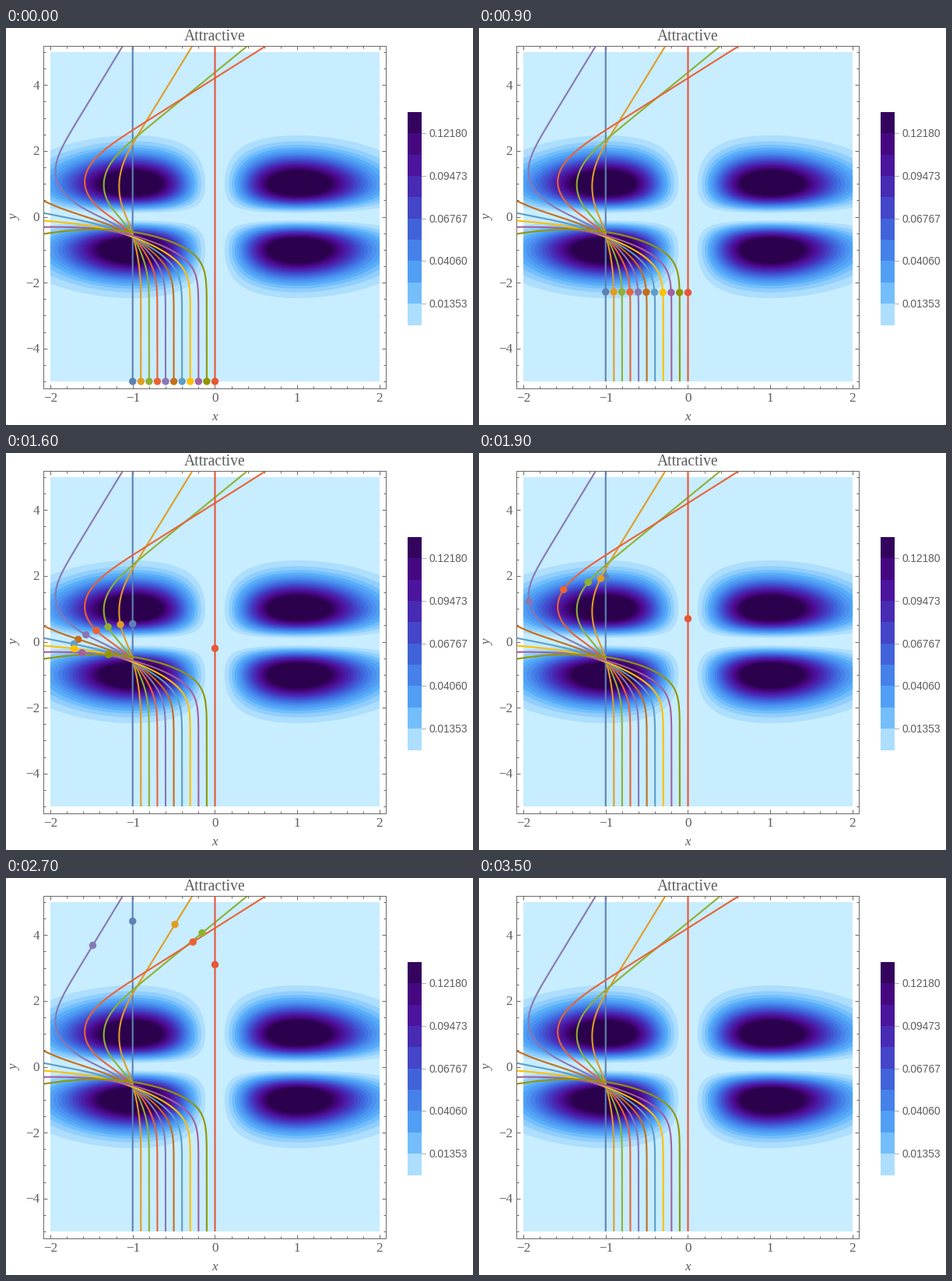
Animation of 600x510 px, one loop 5000 ms. Source, as a matplotlib script:

```python
import numpy as np
import matplotlib.pyplot as plt
from matplotlib.animation import FuncAnimation
from matplotlib.colors import LinearSegmentedColormap
from matplotlib.patches import Rectangle

W, H, DPI = 600, 510, 120
PX = 72 / DPI                      # points per pixel
INTERVAL, FRAMES, LAST = 100, 50, 35
STRIDE, SUB = 0.3, 30              # path length per frame, substeps per frame
INK, GREY = "#5c5c5c", "#6a6a6a"

COLORS = ["#5e81b5", "#e19c24", "#8fb032", "#eb6235", "#8778b3", "#c56e1a",
          "#5d9ec7", "#ffbf00", "#a5609d", "#929600", "#e95536"]
SEA = LinearSegmentedColormap.from_list(
    "sea", ["#c7edff", "#57aefa", "#4072e4", "#4536be", "#4e0b93", "#2b004d"])


# ---- physics: four wells of depth U, launch speed scaled to one ----

def well(x, y):
    return x**2 * y**2 * np.exp(-x**2 - y**2)


def slope(s, pull):
    x, y, vx, vy = s
    e = 2 * pull * x * y * np.exp(-x**2 - y**2)
    return np.array([vx, vy, e * y * (1 - x**2), e * x * (1 - y**2)])


def fly(pull):
    """Paths of all particles for each pull: (step, state, pull, particle)."""
    pull = np.atleast_1d(pull)[:, None]
    x = np.linspace(-1, 0, len(COLORS)) + 0 * pull
    s = np.array([x, x * 0 - 5, x * 0, x * 0 + 1])
    path = [s]
    h = STRIDE / SUB
    for _ in range(LAST * SUB):
        a = slope(s, pull)
        b = slope(s + h / 2 * a, pull)
        c = slope(s + h / 2 * b, pull)
        d = slope(s + h * c, pull)
        s = s + h / 6 * (a + 2 * b + 2 * c + d)
        path.append(s)
    return np.array(path)


def tune():
    """Pull for which four of the paths leave through the top at set points."""
    exits = np.array([-0.267, 0.405, 0.62, -1.112])
    pulls = np.linspace(7.3, 8.4, 89)
    x, y, vx, vy = fly(pulls)[-1][:, :, 1:5]
    miss = x + (5.2 - y) * vx / vy - exits
    return pulls[np.argmin((miss**2).sum(axis=1))]


path = fly(tune())[:, :2, 0]       # (step, xy, particle)

# ---- stage ----
fig = plt.figure(figsize=(W / DPI, H / DPI), dpi=DPI, facecolor="white")
ax = fig.add_axes([48.5 / W, 1 - 462.5 / H, 440 / W, 440 / H])
ax.set(xlim=(-2.08, 2.08), ylim=(-5.2, 5.2))
page = fig.add_axes([0, 0, 1, 1])
page.set(xlim=(0, W), ylim=(H, 0))
page.axis("off")


def write(x, y, text, size, font="Liberation Serif", **kw):
    kw = {"ha": "center", "va": "baseline", **kw}
    page.text(x, y, text, fontsize=size * PX, family=font, color=INK, **kw)


# ---- shaded wells, each level painted over the one below ----
ax.add_patch(Rectangle((-2, -5), 4, 10, color=SEA(0.0), lw=0, zorder=0))
gx, gy = np.meshgrid(np.linspace(-2, 2, 241), np.linspace(-5, 5, 401))
depth = well(gx, gy)
for i in range(1, 21):
    ax.contourf(gx, gy, depth, [0.005 * i, 1], colors=[SEA(i / 20)],
                antialiased=True, zorder=1)
ax.set(xlim=(-2.08, 2.08), ylim=(-5.2, 5.2))

# ---- frame, ticks and labels ----
for side in ax.spines.values():
    side.set(color=GREY, linewidth=PX)
ax.set_xticks(range(-2, 3))
ax.set_yticks(range(-4, 5, 2))
ax.set_xticks(np.arange(-10, 11) / 5, minor=True)
ax.set_yticks(np.arange(-10, 11) / 2, minor=True)
for which, length in (("major", 5), ("minor", 3)):
    ax.tick_params(which=which, direction="in", length=length * PX,
                   width=PX, color=GREY, top=True, right=True,
                   labelbottom=False, labelleft=False)

for n in range(-2, 3):
    write(268.5 + 105.77 * n, 480, f"{n}".replace("-", "−"), 17)
    write(43, 248 - 84.6 * n, f"{2 * n}".replace("-", "−"), 17, ha="right")
write(268, 16, "Attractive", 19.6)
write(267.5, 503.5, "x", 17, style="italic")
write(11, 243, "y", 17, style="italic", rotation=90, va="center")

# ---- colour scale ----
CELL = 27.35
for i in range(10):
    page.add_patch(Rectangle((516, 381.5 - CELL * (i + 1)), 18, CELL,
                             color=SEA((i + 0.5) / 10), lw=0))
for i in range(1, 10, 2):
    y = 381.5 - CELL * i
    page.plot([534, 538.5], [y, y], color="#b0b0b0", lw=PX)
    write(543, y + 5, f"{i * np.exp(-2) / 10:.5f}", 13.8,
          "Liberation Sans", ha="left")

# ---- paths and particles ----
for (x, y), color in zip(path.transpose(2, 1, 0), COLORS):
    ax.plot(x, y, color=color, lw=2.1 * PX, solid_capstyle="butt", zorder=2)
balls = ax.scatter(*path[0], s=(9.4 * PX)**2, c=COLORS, linewidths=0, zorder=3)


def draw(frame):
    balls.set_offsets(path[min(frame, LAST) * SUB].T)
    return [balls]


anim = FuncAnimation(fig, draw, frames=FRAMES, interval=INTERVAL,
                     init_func=lambda: draw(0), repeat=True, repeat_delay=0)
plt.show()
```
